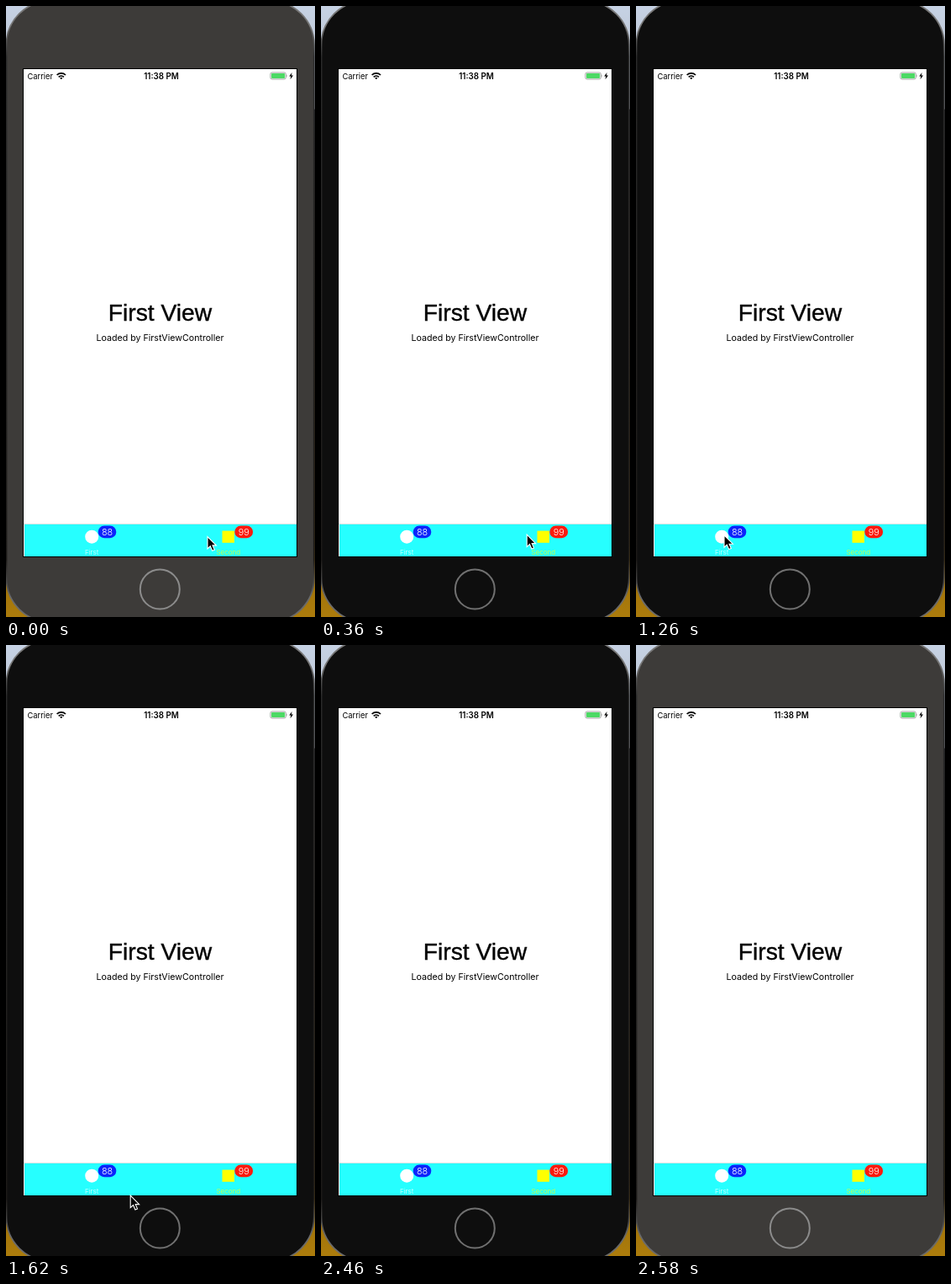
An HTML page that plays this animation: 368 by 726 pixels, repeating every 2640 ms.

```html
<!DOCTYPE html>
<html lang="en">
<head>
<meta charset="utf-8">
<title>Tab bar demo</title>
<style>
  html, body { margin: 0; width: 100%; height: 100%; overflow: hidden; }
  svg { display: block; width: 368px; height: 726px; }
  text { font-family: Inter, sans-serif; }
  .mid { text-anchor: middle; }
  .title { font: 28.26px "Liberation Sans", sans-serif; stroke: #000; stroke-width: .4; }
  .sub { font-size: 10.65px; }
  .status { font-size: 9.3px; }
  .time { font-size: 9.8px; font-weight: 600; }
  .badge { font-size: 10.8px; font-weight: 300; fill: #fff; }
  .label { font-size: 8px; opacity: .7; }
</style>
</head>
<body>
<svg viewBox="0 0 368 726">
  <defs>
    <linearGradient id="desk" x2="0" y2="1">
      <stop offset="0" stop-color="#c6d2e4"/>
      <stop offset=".168" stop-color="#b4b9c2"/>
      <stop offset=".17" stop-color="#16161a"/>
      <stop offset=".5" stop-color="#2c2014"/>
      <stop offset=".88" stop-color="#4a3510"/>
      <stop offset=".94" stop-color="#a0730a"/>
      <stop offset="1" stop-color="#ac7c0c"/>
    </linearGradient>
    <linearGradient id="rim" x2="0" y2="1">
      <stop offset=".04" stop-color="#777"/>
      <stop offset=".09" stop-color="#2a2a2a"/>
      <stop offset=".9" stop-color="#1c1a18"/>
      <stop offset=".96" stop-color="#6a6a6a"/>
    </linearGradient>
  </defs>
  <rect width="368" height="726" fill="url(#desk)"/>
  <rect id="body" x=".5" y="-6" width="366.3" height="738" rx="52" stroke="url(#rim)" stroke-width="1.8"/>
  <circle id="home" cx="183.3" cy="693" r="23.5" fill="none" stroke-width="2"/>
  <rect x="20" y="74" width="327" height="581" fill="#000"/>
  <rect x="21" y="75" width="325" height="579" fill="#fff"/>

  <text class="status" x="25.5" y="86.5">Carrier</text>
  <g fill="none" stroke="#000" stroke-width="1.7">
    <path d="M60.6 82a7.4 7.4 0 0 1 10.4 0M62.7 84.3a4.4 4.4 0 0 1 6.2 0"/>
    <path d="M65.8 87.2l-1.6-1.7a2.3 2.3 0 0 1 3.2 0z" fill="#000" stroke="none"/>
  </g>
  <text class="time mid" x="185" y="86.6">11:38 PM</text>
  <rect x="314.9" y="79" width="18.4" height="8" rx="2" fill="none" stroke="#8c8c8c" stroke-width=".8"/>
  <rect x="316" y="80.1" width="16.2" height="5.8" rx="1" fill="#4cd964"/>
  <path d="M334.2 81.6q1.4 1.4 0 2.8z" fill="#8c8c8c"/>
  <path d="M340.6 79l-3.4 4.6h2.1l-.8 3.6 3.6-4.8h-2.2z"/>

  <text id="title" class="title mid" x="183.5" y="374.3"></text>
  <text id="sub" class="sub mid" x="183.5" y="398"></text>

  <rect x="21" y="615" width="325" height="1" fill="#d5e3e3"/>
  <rect x="22" y="616" width="324" height="38" fill="#26ffff"/>
  <g id="first">
    <circle cx="102.2" cy="630.7" r="8"/>
    <text class="label mid" x="102.2" y="651.5">First</text>
  </g>
  <g id="second">
    <rect x="257.5" y="623.6" width="14.4" height="14.2"/>
    <text class="label mid" x="264.8" y="651.5">Second</text>
  </g>
  <rect x="109.7" y="617.6" width="21.6" height="14.6" rx="7.3" fill="#0b24fb"/>
  <text class="badge mid" x="120.5" y="628.9">88</text>
  <rect x="272.3" y="617.6" width="21.8" height="14.6" rx="7.3" fill="#fb1a0d"/>
  <text class="badge mid" x="283.2" y="628.9">99</text>

  <path id="cursor" d="M0 0V14.4L3.3 11.3 5.7 16.8 8.3 15.7 6 10.4H10.4Z" stroke="#fff" stroke-width="1.1"/>
</svg>
<script>
const LOOP = 2640, STEP = 60;
const el = id => document.getElementById(id);

// Pointer stops: time, x, y
const path = [
  [0, 240, 630.5], [300, 245.2, 628.2], [480, 245.2, 628.2],
  [780, 130.2, 631], [1020, 105, 628.8], [1260, 105, 628.8],
  [1620, 148.2, 654.2], [1920, 190, 728]
];

function pointerAt(t) {
  const i = path.findIndex(stop => stop[0] > t);
  if (i < 0) return null;
  const [t0, x0, y0] = path[i - 1], [t1, x1, y1] = path[i];
  const p = (t - t0) / (t1 - t0), k = p * p * (3 - 2 * p);
  return [x0 + (x1 - x0) * k, y0 + (y1 - y0) * k];
}

function draw(now) {
  const t = Math.floor(now % LOOP / STEP) * STEP;
  const focused = t >= 180 && t < 2520;
  const onSecond = t >= 480 && t < 1200;
  const name = onSecond ? "Second" : "First";

  el("body").setAttribute("fill", focused ? "#0e0e0e" : "#3d3b39");
  el("home").setAttribute("stroke", focused ? "#707070" : "#8b8b8b");
  el("title").textContent = name + " View";
  el("sub").textContent = `Loaded by ${name}ViewController`;
  el("first").setAttribute("fill", onSecond ? "#ff0" : "#fff");
  el("second").setAttribute("fill", onSecond ? "#fff" : "#ff0");

  const pos = pointerAt(t);
  el("cursor").setAttribute("visibility", pos ? "visible" : "hidden");
  if (pos) el("cursor").setAttribute("transform", `translate(${pos})`);
  requestAnimationFrame(draw);
}
requestAnimationFrame(draw);
</script>
</body>
</html>
```
